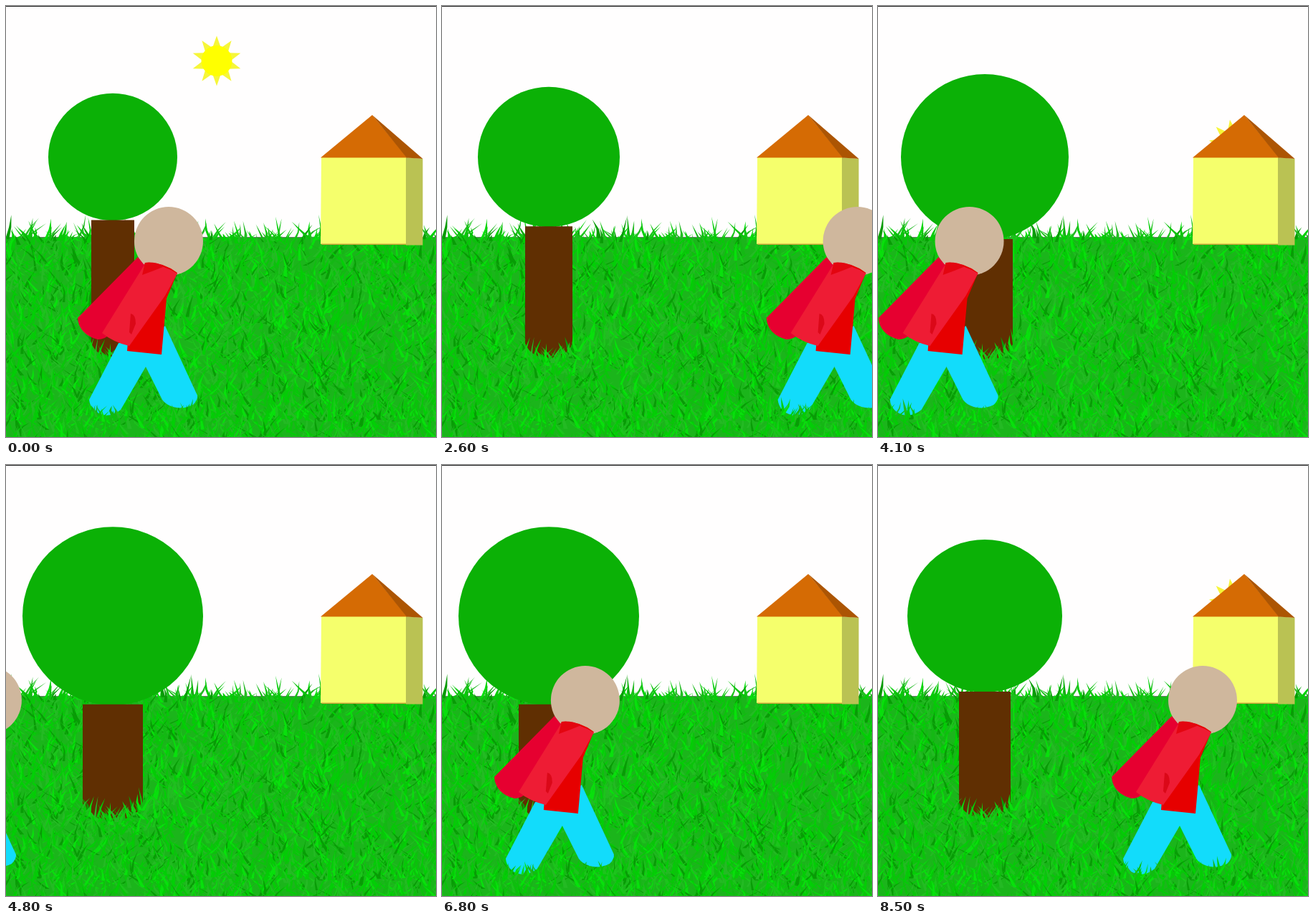
Recreate the animation shown at these times as an HTML page with a canvas. Size 600x601 px, loop 8.6 s.

```html
<!DOCTYPE html>
<html>
<head>
<meta charset="utf-8">
<style>
html, body { margin: 0; width: 100%; height: 100%; overflow: hidden; background: #fffefe; }
canvas { display: block; }
</style>
</head>
<body>
<canvas id="stage" width="600" height="601"></canvas>
<script>
const ctx = document.getElementById('stage').getContext('2d');
const TICK = 100, TICKS = 86;
const WRAP = 68, STEP = 9.04;

// [tick, steps walked]: the walker's pace is uneven
const PACE = [[0, 0], [11, 84], [26, 175], [35, 218], [48, 312], [68, 405], [81, 483], [85, 501]];
// The tree takes a new size each time the walker re-enters
const TREE_SIZES = [1, 1.3, 1.1, 1.2, 1.3, 1.4, 1.4, 1.2];

let seed = 7;
const random = () => (seed = (seed * 1664525 + 1013904223) % 4294967296) / 4294967296;
const between = (a, b) => a + (b - a) * random();

function makeLayer(paint) {
  const layer = document.createElement('canvas');
  layer.width = 600;
  layer.height = 601;
  paint(layer.getContext('2d'));
  return layer;
}

const GREENS = ['#02cf06', '#08e00c', '#0ac40a', '#14b814', '#24ba24', '#089c06', '#04cc06', '#1cc41c'];

// A straight tapering blade, slightly bent near the tip
function blade(g, x, y, length, maxTilt = 1) {
  const tilt = between(-maxTilt, maxTilt);
  const dx = Math.sin(tilt) * length, dy = -Math.cos(tilt) * length;
  const w = between(1.3, 3), bend = between(-3, 3);
  g.fillStyle = GREENS[Math.floor(random() * GREENS.length)];
  g.beginPath();
  g.moveTo(x - w, y);
  g.lineTo(x + dx * 0.5 - w * 0.6 + bend, y + dy * 0.5);
  g.lineTo(x + dx, y + dy);
  g.lineTo(x + dx * 0.5 + w * 0.6 + bend, y + dy * 0.5);
  g.lineTo(x + w, y);
  g.fill();
}

const meadow = makeLayer(g => {
  g.fillStyle = '#1bb51b';
  g.fillRect(0, 323, 600, 278);
  g.fillStyle = '#6b7a6b';
  g.fillRect(0, 322, 600, 1);
  for (let i = 0; i < 230; i++) blade(g, between(-5, 605), between(323, 334), between(8, 36));
  for (let i = 0; i < 4600; i++) blade(g, between(-10, 610), 338 + i / 4600 * 290, between(10, 34), 1.15);
});

const trunkFringe = makeLayer(g => {
  for (let i = 0; i < 48; i++) {
    const x = between(106, 192);
    const drop = 22 * ((x - 149) / 43) ** 2;
    blade(g, x, 497 - drop + between(-1, 6), between(8, 32), 0.7);
  }
});

const footFringe = makeLayer(g => {
  for (let i = 0; i < 210; i++) blade(g, between(-5, 605), between(570, 580), between(8, 27), 0.8);
});

function shape(color, path) {
  ctx.fillStyle = color;
  ctx.fill(new Path2D(path));
}

function ellipse(color, x, y, rx, ry = rx) {
  ctx.fillStyle = color;
  ctx.beginPath();
  ctx.ellipse(x, y, rx, ry, 0, 0, 2 * Math.PI);
  ctx.fill();
}

function drawSun(degrees) {
  ctx.save();
  ctx.translate(300, 300);
  ctx.rotate(degrees * Math.PI / 180);
  ctx.translate(-6, -223.5);
  ctx.fillStyle = '#f6f63a';
  for (let i = 0; i < 10; i++) {
    ctx.beginPath();
    ctx.moveTo(-6, -18);
    ctx.lineTo(0, -35);
    ctx.lineTo(6, -18);
    ctx.fill();
    ctx.rotate(Math.PI / 5);
  }
  ellipse('#ffff00', 0, 0, 21.5);
  ctx.restore();
}

function drawTree(size) {
  const half = 30 * size, top = 211 + 87.6 * size;
  const side = 465 + 5 * size, bottom = 473 + 16 * size;
  ellipse('#0bb106', 149, 210.5, 90 * size, 88.8 * size);
  shape('#602f02', `M${149 - half} ${top}H${149 + half}V${side}Q${149 + half * 0.75} ${bottom} 149 ${bottom}
    Q${149 - half * 0.75} ${bottom} ${149 - half} ${side}Z`);
  ctx.drawImage(trunkFringe, 0, 0);
}

function drawHouse() {
  shape('#f5ff6c', 'M440 211H558V332H439Z');
  shape('#bac253', 'M558 211L581.5 213V333.5H558Z');
  shape('#c7a536', 'M439 331.5H558V333H441Z');
  shape('#d56b04', 'M511 152L439 211.5H560Z');
  shape('#ac5503', 'M511 152L581.5 213L559 211.5Z');
}

// Drawn with the head centred on x = 227
function drawWalker(headX) {
  ctx.save();
  ctx.translate(headX - 227, 0);
  shape('#12dcfb', 'M157 470L205 470L195 503L160 563Q148 573 134 570Q118 565 116 549Z');
  shape('#12dcfb', 'M190 470L222 446L267 543Q268 549 261 556Q247 563 233 559Q223 556 218 549L194 501Z');
  ellipse('#cfb79d', 227, 328, 48);
  shape('#e60030', 'M184 350L192 360L204 366L144 458Q138 465 128 465Q102 458 100 435Z');
  shape('#e60000', 'M194 358Q218 356 239 372L224 408L217 486L169 481L173 430Z');
  shape('#ee1c34', 'M193 361Q217 359 239 373L222 404L172 474Q150 469 134 456Z');
  shape('#e30510', 'M194 358Q207 356 221 363Q207 369 190 375Z');
  shape('#db0818', 'M174 429Q181 430 181 443L175 458L172 455Z');
  ctx.restore();
}

function stepsAt(tick) {
  const i = Math.max(1, PACE.findIndex(([t]) => t >= tick));
  const [t0, s0] = PACE[i - 1], [t1, s1] = PACE[i];
  return Math.round(s0 + (s1 - s0) * (tick - t0) / (t1 - t0));
}

function draw(now) {
  const steps = stepsAt(Math.floor(now / TICK) % TICKS);
  const walked = steps + 28;
  ctx.fillStyle = '#fffefe';
  ctx.fillRect(0, 0, 600, 601);
  drawSun(steps * 3);
  ctx.drawImage(meadow, 0, 0);
  drawHouse();
  drawTree(TREE_SIZES[Math.floor(walked / WRAP)]);
  drawWalker(227 + (walked % WRAP - 28) * STEP);
  ctx.drawImage(footFringe, 0, 0);
  ctx.fillStyle = '#222';
  ctx.fillRect(0, 0, 600, 1);
}

const start = performance.now();
function loop() {
  draw(performance.now() - start);
  requestAnimationFrame(loop);
}
loop();
</script>
</body>
</html>
```
